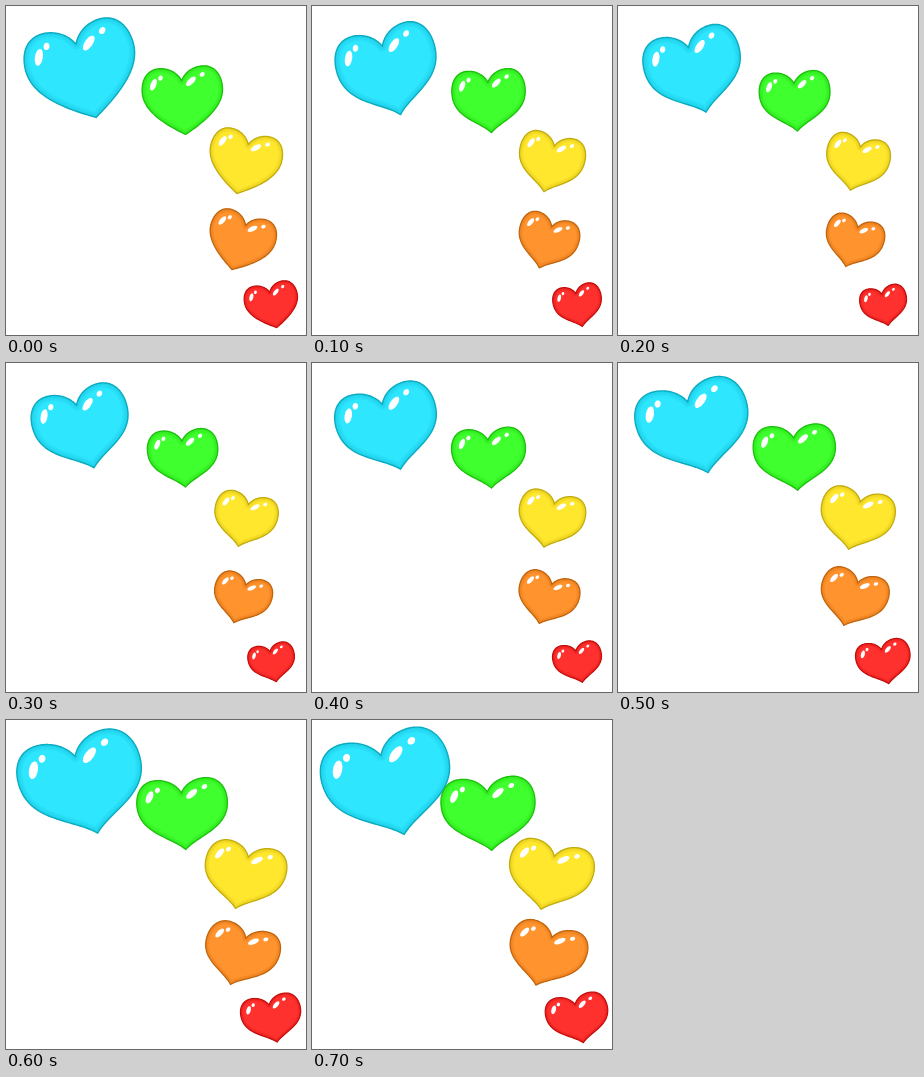
An HTML page with a canvas for the animation above (800 ms loop, 300x329 px).

```html
<!DOCTYPE html>
<html lang="en">
<head>
<meta charset="utf-8">
<title>Beating hearts</title>
<style>
  html, body { margin: 0; width: 100%; height: 100%; overflow: hidden; background: #fff; }
  canvas { display: block; width: 300px; height: 329px; }
</style>
</head>
<body>
<canvas id="stage"></canvas>
<script>
const W = 300, H = 329, STEP = 100, STEPS = 8;
const canvas = document.getElementById('stage');
const ctx = canvas.getContext('2d');
const dpr = window.devicePixelRatio || 1;
canvas.width = W * dpr;
canvas.height = H * dpr;

// centre, resting size, tilt in degrees, hue
const hearts = [
  { x: 73, y: 62, w: 112, h: 102, tilt: -15, hue: 187 },
  { x: 176, y: 94.5, w: 82, h: 71, tilt: -4, hue: 115 },
  { x: 240, y: 155, w: 74, h: 68, tilt: 13, hue: 53 },
  { x: 237, y: 233.5, w: 68, h: 63, tilt: 17, hue: 29 },
  { x: 264.5, y: 298.5, w: 55, h: 49, tilt: -11, hue: 1 }
];

// each shine is a long oval with a dot beside it
const shines = [
  { x: -29, y: -18.6, lean: 24, gap: 7.6 },
  { x: 9.3, y: -19.5, lean: 48, gap: 12 }
];

// a quick deflation from the peak, then a smooth swell back to it
function beat(step) {
  const sinceLow = (step + STEPS - 3) % STEPS;
  const swell = sinceLow <= 4;
  const u = (swell ? sinceLow : sinceLow - 4) / 4;
  const rise = (1 - Math.cos(Math.PI * u)) / 2;
  const wide = swell ? rise : (1 - u) ** 3;
  const tall = swell ? rise : (1 - u) ** 1.5;
  return {
    w: 0.881 + 0.289 * wide,
    h: 0.85 + 0.22 * tall,
    dx: 0.6 * (1 - wide),
    dy: 0.3 - 1.5 * wide,
    pinch: step > 0 ? 1 : 0.1
  };
}

function cubic(a, b, c, d, t) {
  const u = 1 - t;
  return [0, 1].map(i =>
    u * u * u * a[i] + 3 * u * u * t * b[i] + 3 * u * t * t * c[i] + t * t * t * d[i]);
}

function outline(pinch) {
  const mix = (a, b) => a + (b - a) * pinch;
  const curves = [
    [[0, -21], [4, -30], [13, -35], [22, -35]],
    [[22, -35], [34, -35], [41, -25], [41, -11]],
    [[41, -11], [41, mix(8, 17)], [mix(21, 13), mix(24, 22)], [0, 36]]
  ];
  const right = [];
  for (const c of curves)
    for (let i = 0; i < 24; i++) right.push(cubic(...c, i / 24));
  right.push([0, 36]);
  const left = right.slice(1, -1).reverse().map(([x, y]) => [-x, y]);
  return right.concat(left);
}

function rotate([x, y], deg) {
  const a = deg * Math.PI / 180, c = Math.cos(a), s = Math.sin(a);
  return [x * c - y * s, x * s + y * c];
}

function trace(points) {
  ctx.beginPath();
  points.forEach(([x, y]) => ctx.lineTo(x, y));
  ctx.closePath();
}

function drawHeart(heart, pose) {
  const shape = outline(pose.pinch);
  const turned = shape.map(p => rotate(p, heart.tilt));
  const xs = turned.map(p => p[0]), ys = turned.map(p => p[1]);
  const x0 = Math.min(...xs), x1 = Math.max(...xs);
  const y0 = Math.min(...ys), y1 = Math.max(...ys);
  const sx = (heart.w * pose.w - 1.8) / (x1 - x0);
  const sy = (heart.h * pose.h - 1.8) / (y1 - y0);
  const place = p => {
    const [x, y] = rotate(p, heart.tilt);
    return [heart.x + pose.dx + (x - (x0 + x1) / 2) * sx,
            heart.y + pose.dy + (y - (y0 + y1) / 2) * sy];
  };
  const oval = (x, y, rx, ry, lean) => {
    const points = [];
    for (let a = 0; a < Math.PI * 2; a += Math.PI / 16) {
      const [px, py] = rotate([rx * Math.cos(a), ry * Math.sin(a)], lean);
      points.push(place([x + px, y + py]));
    }
    trace(points);
    ctx.fill();
  };

  trace(shape.map(place));
  ctx.fillStyle = `hsl(${heart.hue}, 100%, 59%)`;
  ctx.strokeStyle = `hsl(${heart.hue}, 90%, 40%)`;
  ctx.fill();

  // soft shading just inside the edge
  ctx.save();
  ctx.clip();
  ctx.globalAlpha = 0.12;
  for (let i = 1; i <= 3; i++) {
    ctx.lineWidth = 1 + heart.w * 0.03 * i;
    ctx.stroke();
  }
  ctx.restore();

  ctx.lineJoin = 'round';
  ctx.lineWidth = 1 + heart.w * 0.004;
  ctx.stroke();

  ctx.fillStyle = '#fff';
  for (const { x, y, lean, gap } of shines) {
    oval(x, y, 2.9, 6.4, lean);
    oval(x + gap, y - 6.5, 2.2, 2.8, lean);
  }
}

function render(now) {
  const pose = beat(Math.floor(Math.max(0, now) / STEP) % STEPS);
  ctx.setTransform(dpr, 0, 0, dpr, 0, 0);
  ctx.fillStyle = '#fff';
  ctx.fillRect(0, 0, W, H);
  hearts.forEach(heart => drawHeart(heart, pose));
}

const start = performance.now();
function tick() {
  render(performance.now() - start);
  requestAnimationFrame(tick);
}
tick();
</script>
</body>
</html>
```
